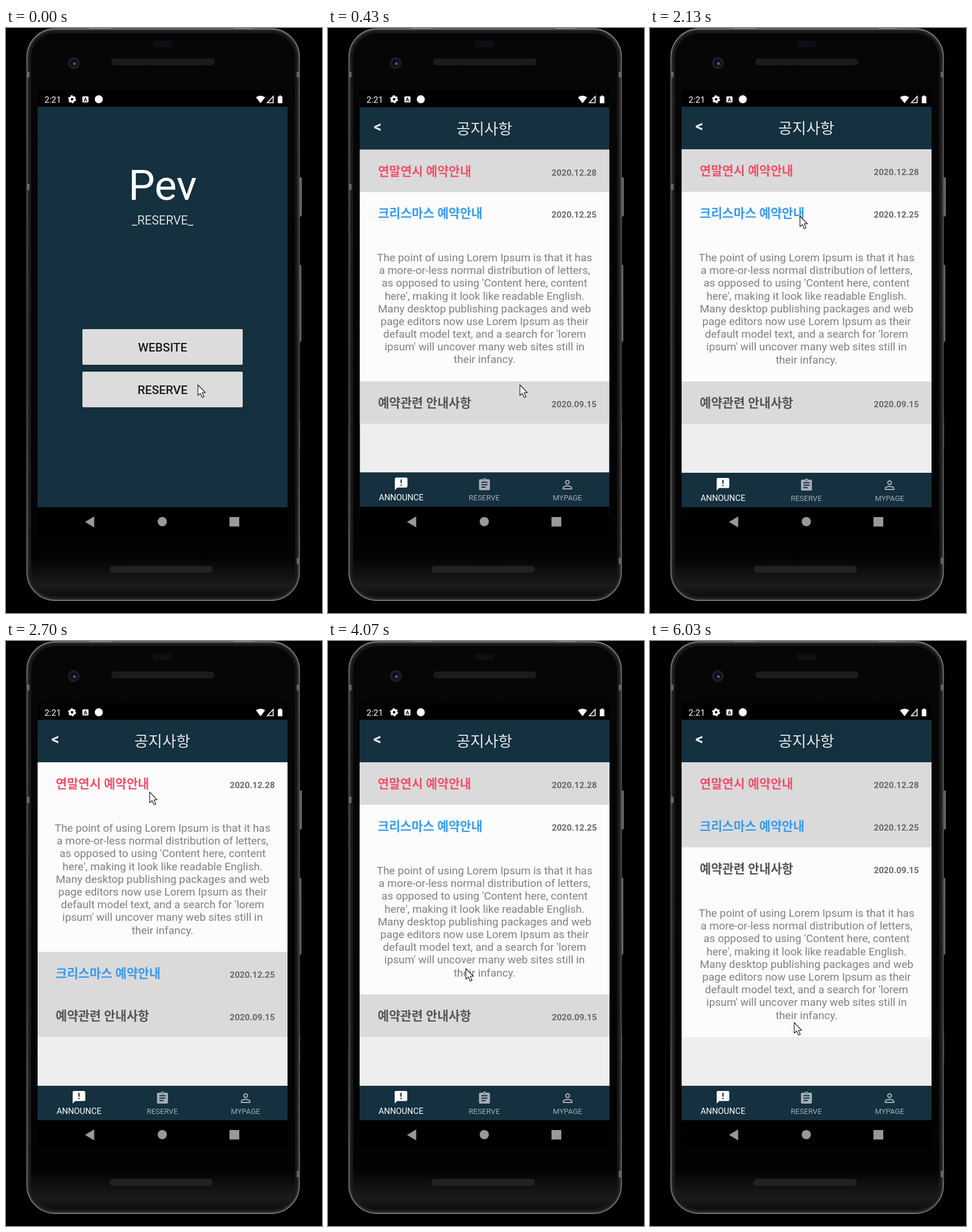
Recreate the animation shown at these times as an HTML page. Size 550 px wide and 1018 px high, loop 6210 ms.

```html
<!DOCTYPE html>
<html lang="ko">
<head>
<meta charset="utf-8">
<title>Notice list</title>
<style>
  html, body { margin: 0; width: 100%; height: 100%; overflow: hidden; background: #000; }
  svg { display: block; width: 550px; height: 1018px; }
  text { font-family: Roboto, "Noto Sans CJK KR", "Noto Sans CJK", sans-serif; }
  .mid { text-anchor: middle; }
  .button { font-size: 20.8px; font-weight: 500; fill: #1c1c1c; }
  .title { font-size: 21.4px; font-weight: 700; }
  .date { font-size: 15.2px; font-weight: 700; fill: #6a6a6a; text-anchor: end; }
  .body { font-size: 18.95px; fill: #808080; }
  .tab { font-size: 13px; fill: #a3adb5; }
</style>
</head>
<body>
<svg viewBox="0 0 550 1018">
  <defs>
    <linearGradient id="shell" x2="0" y2="1">
      <stop offset="0" stop-color="#060606"/>
      <stop offset=".93" stop-color="#030303"/>
      <stop offset=".98" stop-color="#1b1b1b"/>
      <stop offset="1" stop-color="#0c0c0c"/>
    </linearGradient>
    <linearGradient id="rim" x2="0" y2="1">
      <stop offset="0" stop-color="#85857c"/>
      <stop offset=".1" stop-color="#5c5c5a"/>
      <stop offset=".6" stop-color="#444"/>
      <stop offset="1" stop-color="#77776e"/>
    </linearGradient>
    <clipPath id="screen"><path d="M55 108H490V885H55Z"/></clipPath>
    <clipPath id="pressed"><rect x="133" y="598" width="279" height="62" rx="2"/></clipPath>
  </defs>

  <!-- phone -->
  <g fill="#3d3d3d">
    <rect x="508" y="260" width="7" height="68" rx="2" fill="#66665f"/>
    <rect x="508" y="412" width="6" height="134" rx="2" fill="#66665f"/>
    <rect x="507" y="685" width="5" height="48"/>
    <path d="M145 0h38v2h-38zM398 0h32v3h-32z" fill="#77776c"/>
  </g>
  <rect x="36.500" y="1.500" width="474" height="994.500" rx="49" fill="#222" stroke="url(#rim)" stroke-width="2"/>
  <rect x="39.500" y="4.500" width="468" height="988.500" rx="46" fill="#111" stroke="#2b2b2b" stroke-width="2"/>
  <rect x="43" y="8" width="461" height="982" rx="43" fill="url(#shell)" stroke="#242424"/>
  <path d="M36 76h5v10h-5zM36 271h5v11h-5zM506 76h5v10h-5zM506 922h5v11h-5z" fill="#66665c"/>
  <rect x="256" y="22" width="33" height="12" rx="2" fill="#0d0d13"/>
  <rect x="183" y="53" width="180" height="12" rx="6" fill="#1b1b1d"/>
  <rect x="180" y="936" width="180" height="12" rx="6" fill="#222224"/>
  <circle cx="118" cy="61" r="10.5" fill="#1c1c20"/>
  <circle cx="118" cy="61" r="6" fill="#0b0b18"/>
  <circle cx="119" cy="62" r="2.5" fill="#4a5aa0"/>

  <g clip-path="url(#screen)">
    <path d="M55 108H490V885H55Z"/>
    <g id="home">
      <path d="M55 137H490V834H55Z" fill="#15303f"/>
      <text class="mid" x="272.5" y="299" font-size="73" fill="#fff">Pev</text>
      <text class="mid" x="272.5" y="342" font-size="21.2" fill="#d3dade">_RESERVE_</text>
      <g fill="#dcdcdc">
        <rect x="133" y="524" width="279" height="62" rx="2"/>
        <rect x="133" y="598" width="279" height="62" rx="2"/>
      </g>
      <g clip-path="url(#pressed)"><circle id="ripple" cx="334" cy="621" r="0" fill-opacity=".1"/></g>
      <text class="mid button" x="272.5" y="563">WEBSITE</text>
      <text class="mid button" x="272.5" y="637">RESERVE</text>
    </g>

    <g id="notices">
      <path d="M55 108H490V885H55Z"/>
      <path d="M55 137H490V834H55Z" fill="#15303f"/>
      <path d="M55 211H490V774H55Z" fill="#eee"/>
      <text x="79" y="180" font-size="27" font-weight="700" fill="#e3e8ea">&lt;</text>
      <text class="mid" x="272" y="184" font-size="26.5" fill="#e3e8ea">공지사항</text>
      <g id="list"></g>
      <g fill="#a3adb5">
        <path fill="#fff" transform="translate(113.8 780.8) scale(1.1)" d="M20 2H4c-1.1 0-2 .9-2 2v18l4-4h14c1.1 0 2-.9 2-2V4c0-1.1-.9-2-2-2zm-7 9h-2V5h2v6zm0 4h-2v-2h2v2z"/>
        <path transform="translate(259.6 782.8) scale(1.06)" d="M19 3h-4.2a3 3 0 0 0-5.6 0H5c-1.1 0-2 .9-2 2v14c0 1.1.9 2 2 2h14c1.1 0 2-.9 2-2V5c0-1.1-.9-2-2-2zm-7 0a1 1 0 1 1 0 2 1 1 0 0 1 0-2zm2 14H7v-2h7v2zm3-4H7v-2h10v2zm0-4H7V7h10v2z"/>
        <g transform="translate(404.3 782.8) scale(1.06)" fill="none" stroke="#a3adb5" stroke-width="1.9">
          <circle cx="12" cy="8" r="3.05"/>
          <path d="M5 19V17c0-1.7 4.3-3 7-3s7 1.3 7 3v2z"/>
        </g>
      </g>
      <text class="mid" x="127" y="823" font-size="14.6" fill="#fff">ANNOUNCE</text>
      <text class="mid tab" x="272" y="823">RESERVE</text>
      <text class="mid tab" x="417" y="823">MYPAGE</text>
    </g>
  </g>

  <!-- status and navigation bars -->
  <g fill="#fff">
    <text x="67" y="130" font-size="15">2:21</text>
    <circle cx="115" cy="124" r="4" fill="none" stroke="#fff" stroke-width="3.4"/>
    <circle cx="115" cy="124" r="6" fill="none" stroke="#fff" stroke-width="2" stroke-dasharray="3.14"/>
    <rect x="133" y="119" width="10.5" height="10.5" rx="1"/>
    <text class="mid" x="138.2" y="127.5" font-size="9" font-weight="700" style="fill:#000">A</text>
    <circle cx="161.5" cy="124" r="7"/>
    <path d="M435 120.5q8-5.5 16 0L443 131z"/>
    <path d="M455 130h10v-11z" fill="none" stroke="#fff" stroke-width="1.6"/>
    <path d="M473 119h2.5v-1.5h3.5V119H481v12h-8z"/>
  </g>
  <g fill="#999">
    <path d="M137.5 859.5 153.5 850v19z"/>
    <circle cx="272" cy="859" r="8"/>
    <path d="M389 851h17v16.5h-17z"/>
  </g>

  <path id="cursor" d="M0 0V18.500L4.300 14.700 7.500 22 10.600 20.600 7.400 13.500H13z" fill="#fff" stroke="#222" stroke-width="1.2" stroke-linejoin="round"/>
</svg>

<script>
const LOOP = 6210;
const TOP = 211, ROW = 74, BODY = 256;
const items = [
  ["연말연시 예약안내", "2020.12.28", "#f2506a"],
  ["크리스마스 예약안내", "2020.12.25", "#369bf2"],
  ["예약관련 안내사항", "2020.09.15", "#555"],
];
const lines = [
  "The point of using Lorem Ipsum is that it has",
  "a more-or-less normal distribution of letters,",
  "as opposed to using 'Content here, content",
  "here', making it look like readable English.",
  "Many desktop publishing packages and web",
  "page editors now use Lorem Ipsum as their",
  "default model text, and a search for 'lorem",
  "ipsum' will uncover many web sites still in",
  "their infancy.",
];

const el = id => document.getElementById(id);
const span = (t, from, to) => Math.min(1, Math.max(0, (t - from) / (to - from)));
const easeOut = (u, power = 5) => 1 - (1 - u) ** power;
const easeInOut = u => u * u * (3 - 2 * u);
const mix = (a, b, u) => a + (b - a) * u;
const zoom = s => `translate(272 485.5) scale(${s}) translate(-272 -485.5)`;

function listMarkup(open) {
  let y = TOP;
  return items.map(([title, date, color], i) => {
    const height = ROW + (i === open ? BODY : 0);
    const row = `<path d="M55 ${y}h435v${height}h-435z" fill="${i === open ? "#fcfcfc" : "#dadada"}"/>
      <text class="title" x="86.5" y="${y + 45}" fill="${color}">${title}</text>
      <text class="date" x="468" y="${y + 45}">${date}</text>`;
    const body = i === open ? lines.map((line, n) =>
      `<text class="mid body" x="272.5" y="${y + 121 + n * 22.2}">${line}</text>`).join("") : "";
    y += height;
    return row + body;
  }).join("");
}

function cursorAt(t) {
  if (t < 3370) {
    const u = span(t, 1970, 2570);
    return [mix(334, 250, easeOut(u, 6.5)), mix(621, 263, easeOut(u, 5.5))];
  }
  if (t < 4730) {
    const u = easeInOut(span(t, 3370, 3770));
    return [mix(250, 240, u) + 320 * u * (1 - u), mix(263, 570, u)];
  }
  const u = easeInOut(span(t, 4730, 5170));
  return [mix(240, 251, u), mix(570, 664, u)];
}

let shown = -1;
function draw(t) {
  const enter = easeOut(span(t, 220, 600));
  el("ripple").setAttribute("r", 290 * span(t, 30, 280));
  el("home").setAttribute("transform", zoom(mix(1, 1.048, enter)));
  el("notices").setAttribute("transform", zoom(mix(0.85, 1, enter)));
  el("notices").setAttribute("opacity", span(t, 265, 315));

  const open = t < 2700 ? 1 : t < 4000 ? 0 : t < 5370 ? 1 : 2;
  if (open !== shown) el("list").innerHTML = listMarkup(shown = open);
  el("cursor").setAttribute("transform", `translate(${cursorAt(t)})`);
}

function frame() {
  draw(performance.now() % LOOP);
  requestAnimationFrame(frame);
}
frame();
</script>
</body>
</html>
```
